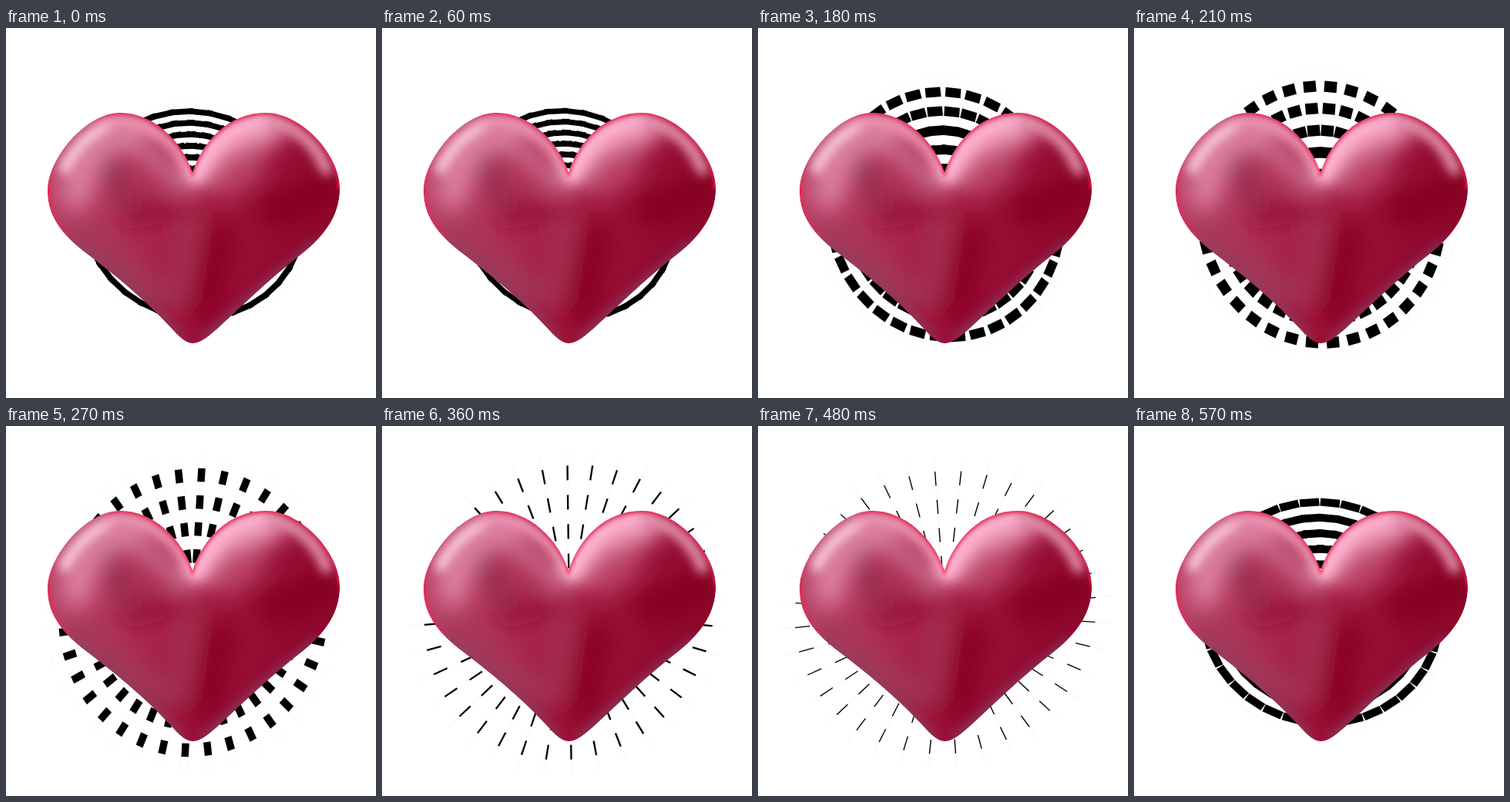
Animation, 480 px wide and 480 px high, one loop 0.6 s. Source, as an HTML page with a canvas:

```html
<!DOCTYPE html>
<html lang="en">
<head>
<meta charset="utf-8">
<title>Heart burst</title>
<style>
  html, body { margin: 0; width: 100%; height: 100%; overflow: hidden; background: #fff; }
  canvas, svg { position: absolute; left: 0; top: 0; width: 480px; height: 480px; }
  .soft path { fill: none; stroke-linecap: round; }
</style>
</head>
<body>
<canvas id="rays" width="480" height="480"></canvas>
<svg viewBox="0 0 480 480">
  <defs>
    <path id="heart" d="M242 188C228 145 190 110 148 110C104 110 54 168 54 212C54 248 78 272 104 292C150 327 185 357 216 391C226 402 234 409 242 409C252 409 260 402 272 392C306 361 340 327 385 292C415 268 433 242 433 208C433 164 383 110 337 110C290 110 256 145 242 188Z"/>
    <clipPath id="inside"><use href="#heart"/></clipPath>
    <linearGradient id="base" x1="0" y1="0" x2="1" y2=".3">
      <stop offset="0" stop-color="#bd4a70"/>
      <stop offset=".45" stop-color="#a92a4e"/>
      <stop offset=".7" stop-color="#9c1238"/>
      <stop offset="1" stop-color="#8e082e"/>
    </linearGradient>
    <filter id="blur2" filterUnits="userSpaceOnUse" x="0" y="0" width="480" height="480"><feGaussianBlur stdDeviation="2"/></filter>
    <filter id="blur7" filterUnits="userSpaceOnUse" x="0" y="0" width="480" height="480"><feGaussianBlur stdDeviation="7"/></filter>
    <filter id="blur14" filterUnits="userSpaceOnUse" x="0" y="0" width="480" height="480"><feGaussianBlur stdDeviation="14"/></filter>
  </defs>
  <g clip-path="url(#inside)">
    <use href="#heart" fill="url(#base)"/>
    <!-- broad light and shade -->
    <g class="soft" filter="url(#blur14)">
      <path d="M92 215C90 178 125 138 168 136" stroke="#de84a5" stroke-width="38"/>
      <path d="M176 158Q200 172 226 202" stroke="#cc6a8e" stroke-width="26"/>
      <path d="M136 168Q136 210 180 240" stroke="#8f2c4e" stroke-width="17"/>
      <path d="M165 246L222 236" stroke="#9a0e38" stroke-width="26"/>
      <path d="M92 266Q140 305 200 345" stroke="#a03a5a" stroke-width="28"/>
      <path d="M238 250L224 350" stroke="#a43858" stroke-width="18"/>
      <path d="M252 188C264 160 295 138 345 132" stroke="#f2a0c0" stroke-width="36"/>
      <path d="M288 205L325 175" stroke="#bf4a70" stroke-width="28"/>
      <path d="M350 236Q395 225 415 205" stroke="#860020" stroke-width="46"/>
      <path d="M280 270L262 365" stroke="#8a0028" stroke-width="38"/>
    </g>
    <!-- sheen near the edges -->
    <g class="soft" filter="url(#blur7)">
      <path d="M76 182Q96 142 136 124" stroke="#ffd0e2" stroke-width="15"/>
      <path d="M130 122C180 114 222 146 241 190" stroke="#f29ab8" stroke-width="15"/>
      <path d="M247 190C258 158 288 126 338 120" stroke="#ffb4d0" stroke-width="20"/>
      <path d="M340 120Q395 130 416 184" stroke="#e796b2" stroke-width="15"/>
      <path d="M82 278Q165 335 226 404" stroke="#86405f" stroke-width="9"/>
      <path d="M258 406Q320 345 404 280" stroke="#85456a" stroke-width="9"/>
    </g>
    <g class="soft" filter="url(#blur2)">
      <path d="M80 272C30 226 54 110 148 110C190 110 228 145 242 188C256 145 290 110 337 110C383 110 433 164 433 208" stroke="#ee2450" stroke-width="4"/>
    </g>
  </g>
</svg>
<script>
const LOOP = 600, STEP = 30, RAYS = 36;
const ctx = document.getElementById('rays').getContext('2d');
const rad = deg => deg * Math.PI / 180;

function ease(t, from, to) {
  const k = Math.min(1, Math.max(0, (t - from) / (to - from)));
  return k * k * (3 - 2 * k);
}

function eachRay(turn, paint) {
  for (let i = 0; i < RAYS; i++) {
    ctx.save();
    ctx.rotate(rad(turn + i * 360 / RAYS));
    paint();
    ctx.restore();
  }
}

function bar(radius, length, width, colour) {
  ctx.fillStyle = colour;
  ctx.fillRect(-width / 2, -radius, width, length);
}

function draw(time) {
  // the cycle runs from 30 to 630 so the collapse can cross the loop point
  const t = Math.floor((time + LOOP - STEP) % LOOP / STEP) * STEP + STEP;
  const spread = ease(t, 40, 350) - ease(t, 480, 620);
  const thin = ease(t, 30, 400) - ease(t, 480, 610);
  const tip = 140 + 61 * spread;
  const period = 13.5 + 23 * spread;
  const width = 30 - 28.7 * thin;
  const turn = 5 - 10 * ease(t, 200, 430);
  const axis = rad(20 + 180 * t / LOOP);

  ctx.setTransform(1, 0, 0, 1, 0, 0);
  ctx.fillStyle = '#fff';
  ctx.fillRect(0, 0, 480, 480);
  // slightly oval, with the long axis slowly turning
  ctx.translate(243, 242);
  ctx.rotate(axis);
  ctx.scale(1.075, 1);
  ctx.rotate(-axis);

  eachRay(turn, () => bar(tip, tip, width + 1, '#f5f5f5'));
  eachRay(turn, () => bar(tip - .5, tip, width, '#fff'));
  eachRay(turn, () => {
    for (let r = tip - period / 2; r > 40; r -= period) bar(r, period / 2, width, '#000');
  });
}

function tick() {
  draw(performance.now() - start);
  requestAnimationFrame(tick);
}
const start = performance.now();
tick();
</script>
</body>
</html>
```
